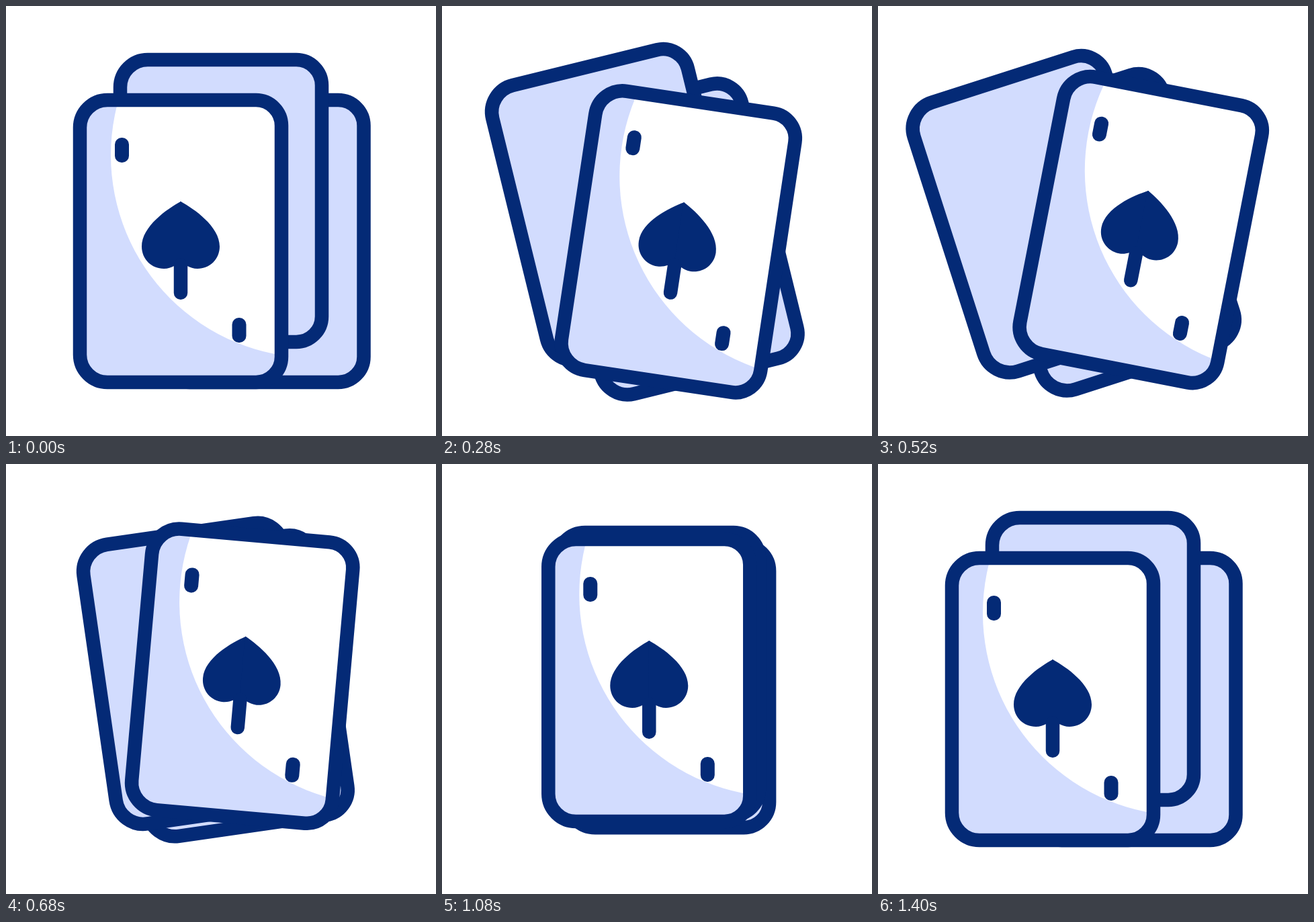
Animation of 640x640 px, one loop 1.48 s. Source, as an HTML page with a canvas:

```html
<!DOCTYPE html>
<html lang="en">
<head>
<meta charset="utf-8">
<title>Cards</title>
<style>
  html, body { margin: 0; width: 100%; height: 100%; overflow: hidden; background: #fff; }
  canvas { display: block; width: 100vmin; height: 100vmin; }
</style>
</head>
<body>
<canvas id="stage" width="640" height="640"></canvas>
<script>
const ctx = document.getElementById('stage').getContext('2d');
const NAVY = '#042a76', PALE = '#d2dcfe', WHITE = '#fff';
const LOOP = 1480, STEP = 40;
const FAN_END = 400, GATHER_END = 888, DEAL_START = 1040, DEAL_END = 1400;

const point = (x, y) => ({ x, y });

// Key positions of each card's centre; the bends bow its way to the fan and to the stack.
const back = {
  tilt: -21, home: point(382.5, 350), fan: point(332, 343), stack: point(335.5, 330.5),
  fanBend: point(-58, 14), gatherBend: point(8, -33)
};
const middle = {
  tilt: -21, home: point(320, 290), fan: point(235, 309), stack: point(322, 312.8),
  fanBend: point(-21, -50), gatherBend: point(0, 5)
};
const front = {
  tilt: 13, home: point(260, 350), fan: point(399, 351), stack: point(310, 321),
  fanBend: point(0, 0), gatherBend: point(46, -115)
};

const clamp = v => Math.min(1, Math.max(0, v));
const smooth = p => p * p * (3 - 2 * p);
const span = (t, from, to) => clamp((t - from) / (to - from));

function travel(a, b, p, bend = point(0, 0)) {
  const bow = p * (1 - p) ** 1.5;
  return point(a.x + (b.x - a.x) * p + bend.x * bow, a.y + (b.y - a.y) * p + bend.y * bow);
}

function pose(card, t) {
  if (t < FAN_END) {
    const p = smooth(span(t, 0, FAN_END) ** 1.4);
    return { ...travel(card.home, card.fan, p, card.fanBend), angle: card.tilt * p };
  }
  if (t < DEAL_START) {
    const p = smooth(span(t, FAN_END, GATHER_END));
    return { ...travel(card.fan, card.stack, p, card.gatherBend), angle: card.tilt * (1 - p) };
  }
  const p = smooth(span(t, DEAL_START, DEAL_END));
  return { ...travel(card.stack, card.home, p), angle: 0 };
}

function cardPath() {
  ctx.beginPath();
  ctx.roundRect(-150, -210, 300, 420, [41, 38, 38, 41]);
}

function pill(x, y, w, h) {
  ctx.beginPath();
  ctx.roundRect(x - w / 2, y - h / 2, w, h, 10);
  ctx.fill();
}

function spade() {
  for (const side of [-1, 1]) {
    ctx.save();
    ctx.scale(side, 1);
    ctx.beginPath();
    ctx.moveTo(0, -59);
    ctx.bezierCurveTo(20, -48, 58, -22, 58, 8);
    ctx.bezierCurveTo(58, 27, 43, 41, 25, 41);
    ctx.bezierCurveTo(19, 41, 14, 39, 10, 37);
    ctx.lineTo(-1, 37);
    ctx.lineTo(-1, -58.4);
    ctx.fill();
    ctx.restore();
  }
  pill(0, 56, 20.5, 62);
}

function face() {
  ctx.save();
  cardPath();
  ctx.clip();
  ctx.fillStyle = WHITE;
  ctx.beginPath();
  ctx.arc(197.5, -128, 301.5, 0, Math.PI * 2);
  ctx.fill();
  ctx.restore();
  ctx.fillStyle = NAVY;
  pill(-87.5, -135.5, 21, 37);
  pill(87, 132.5, 21, 37);
  spade();
}

function drawCard(card, t) {
  const { x, y, angle } = pose(card, t);
  ctx.save();
  ctx.translate(x, y);
  ctx.rotate(angle * Math.PI / 180);
  cardPath();
  ctx.fillStyle = PALE;
  ctx.fill();
  if (card === front) face();
  cardPath();
  ctx.strokeStyle = NAVY;
  ctx.lineWidth = 20.5;
  ctx.stroke();
  ctx.restore();
}

function draw(now) {
  const t = Math.floor((now % LOOP) / STEP) * STEP;
  ctx.fillStyle = WHITE;
  ctx.fillRect(0, 0, 640, 640);
  for (const card of [back, middle, front]) drawCard(card, t);
}

const start = performance.now();
function tick() {
  draw(performance.now() - start);
  requestAnimationFrame(tick);
}
tick();
</script>
</body>
</html>
```
